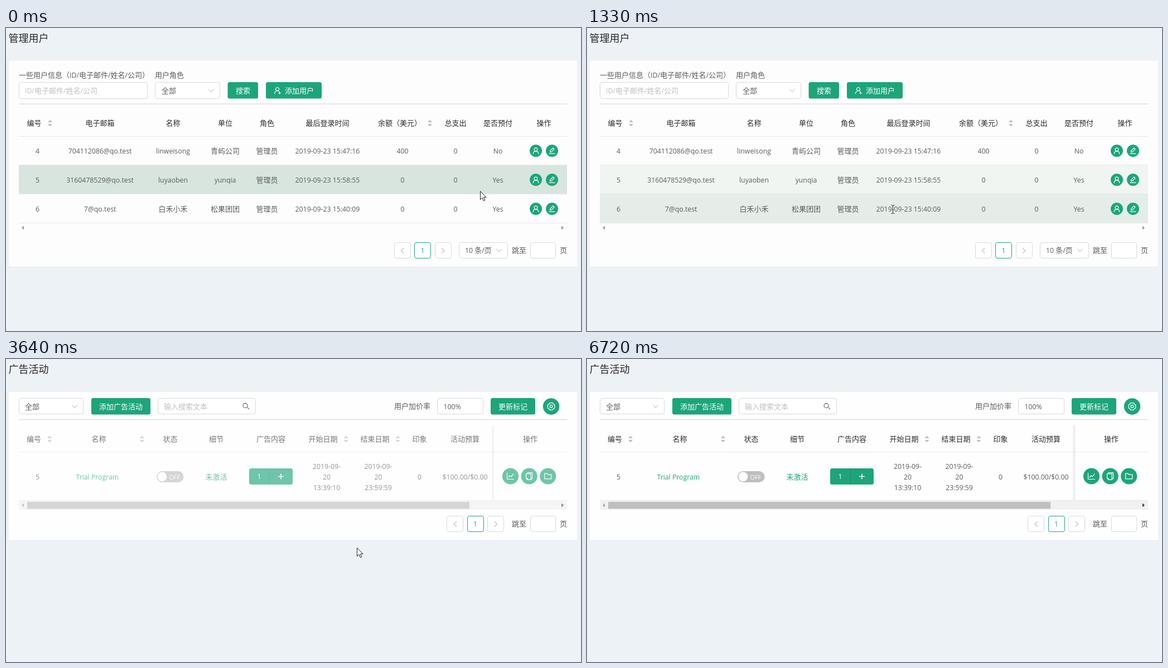
Write an HTML page that moves like this. It is 1031x543 px and loops after 7.15 s.

```html
<!DOCTYPE html>
<html lang="zh-CN">
<head>
<meta charset="utf-8">
<title>管理</title>
<style>
html, body { margin: 0; width: 100%; height: 100%; overflow: hidden; background: #edf2f7; }
svg { display: block; }
text { font: 13px 'Open Sans', 'Noto Sans CJK SC', 'Noto Sans CJK', sans-serif; fill: #5c5c5c; }
.l { font-size: .945em; }
.mid { text-anchor: middle; }
.head { fill: #2b2b2b; }
.title { font-size: 18px; fill: #262626; }
.hint { fill: #bfbfbf; }
.white { fill: #fff; }
.green { fill: #1da57a; }
.off { font-size: 11.5px; fill: #fff; }
.icon { fill: none; stroke: #fff; stroke-width: 1.2; stroke-linejoin: round; stroke-linecap: round; }
.chev { fill: none; stroke: #bfbfbf; stroke-width: 1.1; }
</style>
</head>
<body>
<svg width="1031" height="543" viewBox="0 0 1031 543">
  <defs>
    <linearGradient id="edge">
      <stop offset="0" stop-color="#000" stop-opacity="0"/>
      <stop offset="1" stop-color="#000" stop-opacity=".1"/>
    </linearGradient>
  </defs>
  <g id="users"></g>
  <g id="ads"></g>
  <g id="pointer">
    <path id="arrow" d="M.5.5V15.5L4 12.2L6.4 17.8L8.8 16.8L6.4 11.3H11Z" fill="#fff" stroke="#222" stroke-linejoin="round"/>
    <path id="beam" d="M-2.5-7.5H-1L.5-6.5L2-7.5H3.5M-2.5 7.5H-1L.5 6.5L2 7.5H3.5M.5-6.5V6.5" fill="none" stroke="#222"/>
    <path id="hand" d="M-1.5 1Q-1.5-.5 0-.5T1.5 1V6.5Q3 5.3 4.3 6.8Q6 6 7 7.6Q9 7.2 9.2 9.3V13Q9 16 7 18V20.5H-1V18.5L-5.5 12.5Q-6.2 10.8-4.8 10.2Q-3.5 10-1.5 12.5Z" fill="#fff" stroke="#222" stroke-linejoin="round"/>
  </g>
</svg>
<script>
const $ = id => document.getElementById(id);
const GREEN = '#1da57a', LINE = '#d9d9d9', SOFT = '#e8e8e8', HOVER = '#d8e5de';

const latin = s => s.replace(/[\x20-\x7e]+/g, m => `<tspan class="l">${m}</tspan>`);
const text = (x, cy, s, cls = '') => `<text x="${x}" y="${cy + 4.7}" class="${cls}">${latin(s)}</text>`;
const mid = (x, cy, s, cls = '') => text(x, cy, s, 'mid ' + cls);
const rect = (x, y, w, h, fill, extra = '') =>
  `<rect x="${x}" y="${y}" width="${w}" height="${h}" fill="${fill}" ${extra}/>`;
const box = (x, y, w, h, stroke = LINE) =>
  rect(Math.round(x) + .5, y + .5, w - 1, h - 1, '#fff', `rx="3.5" stroke="${stroke}"`);
const button = (x, y, w, h) => rect(x, y, w, h, GREEN, 'rx="3.5"');
const rule = (y, color) => rect(23, y, 983, 1, color);
const chev = (x, y) => `<path class="chev" d="M${x - 4.5} ${y - 2.5}l4.5 5 4.5-5"/>`;
const sorter = (x, y) =>
  `<path fill="#bfbfbf" d="M${x - 4} ${y - 1.5}h8l-4-4.5zM${x - 4} ${y + 1.5}h8l-4 4.5z"/>`;
const tri = (x, y, dir, color) =>
  `<path fill="${color}" d="M${x - 2 * dir} ${y - 3.5}v7l${4 * dir}-3.5z"/>`;
const headRow = (cols, cy) => Object.entries(cols).map(([name, x]) => mid(x, cy, name, 'head')).join('');

const shapes = {
  user: '<circle cy="-2.2" r="2.9"/><path d="M-4.8 5.6C-4.6-.6 4.6-.6 4.8 5.6"/>',
  edit: '<path d="M-3.6 2.4l.6-2.8 4.8-4.8 2.2 2.2-4.8 4.8zM-5 5.2h10"/>',
  add: '<circle cx="-.5" cy="-2.5" r="3"/><path d="M-5.5 5.5C-5-.2 2-.2 3 2M1.5 4.5h4M3.5 2.5v4"/>',
  chart: '<path d="M-6-5.5v11h12M-3.5 2l3-3.2 2 2 3.8-4.6"/>',
  copy: '<path d="M-3-4.5v-1.8h8.5v11h-1.8M-5.5-4.3h8.5v10.6h-6l-2.5-2.5zM-5.5 3.8h2.5v2.5"/>',
  folder: '<path d="M-6-4.8h4.2l1.6 2h6.2v7.6h-12z"/>',
  gear: '<path d="M-2.6-6.4h5.2l1 2 2.6 1.4v6l-2.6 1.4-1 2h-5.2l-1-2-2.6-1.4v-6l2.6-1.4z"/><circle r="2.4"/>',
  plus: '<path stroke-width="1.6" d="M-4.3 0h8.6M0-4.3v8.6"/>'
};
const icon = (x, y, name) => `<g class="icon" transform="translate(${x} ${y})">${shapes[name]}</g>`;
const round = (x, y, r, name) => `<circle cx="${x}" cy="${y}" r="${r}" fill="${GREEN}"/>` + icon(x, y, name);

function pager(x, y) {
  const cy = y + 14.5, pitch = 36.5;
  const step = (px, d) => box(px, y, 30, 29) +
    `<path class="chev" d="M${px + 15 - 2.5 * d} ${cy - 4}l${5 * d} 4.5l${-5 * d} 4.5"/>`;
  return step(x, -1) + box(x + pitch, y, 30, 29, GREEN) + mid(x + pitch + 14.8, cy, '1', 'green') +
    step(x + 2 * pitch, 1) + text(907, cy, '跳至') + box(940, y, 46, 29) + text(993, cy, '页');
}

function usersPage() {
  const cols = { 编号: 50.5, 电子邮箱: 168.5, 名称: 299.5, 单位: 393, 角色: 468, 最后登录时间: 576.5,
    '余额（美元）': 706, 总支出: 806, 是否预付: 882, 操作: 964.5 };
  const xs = Object.values(cols);
  xs[0] += 6;
  xs[6] += 5;
  const rows = [
    '4|704112086@qo.test|linweisong|青屿公司|管理员|2019-09-23 15:47:16|400|0|No',
    '5|3160478529@qo.test|luyaoben|yunqia|管理员|2019-09-23 15:58:55|0|0|Yes',
    '6|7@qo.test|白禾小禾|松果团团|管理员|2019-09-23 15:40:09|0|0|Yes'
  ];
  let s = text(4.5, 20.5, '管理用户', 'title') + rect(5, 59, 1019, 368, '#fdfdfd');
  s += text(23, 84, '一些用户信息（ID/电子邮件/姓名/公司）') + text(267, 84, '用户角色');
  s += box(23, 97, 231, 30) + text(34, 112.5, 'ID/电子邮件/姓名/公司', 'hint');
  s += box(267, 97, 117, 30) + text(279, 112, '全部') + chev(368, 112);
  s += button(397.5, 97, 54.5, 29.5) + mid(425, 112, '搜索', 'white');
  s += button(466, 97, 100, 29.5) + icon(487, 112, 'add') + text(500, 112, '添加用户', 'white');
  s += rect(23, 135.5, 983, 1.2, LINE) + headRow(cols, 170);
  s += sorter(79, 170.5) + sorter(760, 170.5) + rule(194, SOFT);
  rows.forEach((row, i) => {
    const cy = 220 + 52 * i;
    s += rect(23, cy - 26, 983, 52, HOVER, `id="row${i}"`) + rule(cy + 25, SOFT);
    row.split('|').forEach((v, k) => { s += mid(xs[k], cy, v); });
    s += round(950, cy, 11, 'user') + round(979, cy, 11, 'edit');
  });
  s += rect(514, 350, 358, 9, '#eee', 'id="track"');
  s += tri(30, 358, -1, '#9a9a9a') + tri(998, 358, 1, '#9a9a9a');
  return s + pager(695.7, 384) + box(812, 384, 88, 29) + text(823, 398.5, '10 条/页') + chev(884, 398.5);
}

function adsPage() {
  const cols = { 编号: 50, 名称: 166.5, 状态: 294.5, 细节: 377, 广告内容: 475, 开始日期: 568.5,
    结束日期: 661.5, 印象: 741.5, 活动预算: 823, 操作: 940 };
  let s = text(4.5, 20.5, '广告活动', 'title') + rect(5, 59, 1019, 265, '#fefefe');
  s += box(23, 70, 116, 29) + text(34, 85, '全部') + chev(123, 85);
  s += button(153, 70, 106, 29.5) + mid(206, 85, '添加广告活动', 'white');
  s += box(272, 70, 176, 29) + text(283, 85.5, '输入搜索文本', 'hint');
  s += '<g fill="none" stroke="#777" stroke-width="1.3"><path d="M432.4 86.4L436 90"/><circle cx="429" cy="83.5" r="4"/></g>';
  s += text(696, 84.5, '用户加价率') + box(773, 70, 83, 29) + text(784.5, 85.5, '100%');
  s += button(869, 70, 80, 29.5) + mid(909, 85, '更新标记', 'white') + round(977.5, 85, 14.7, 'gear');
  s += rect(23, 108, 983, 1.2, LINE) + '<g id="table">';
  s += rect(23, 167, 983, 87, HOVER, 'id="row3"') + rule(166.5, SOFT) + rule(253, SOFT) + headRow(cols, 143);
  for (const x of [78, 244, 609.5, 702.5]) s += sorter(x, 143.5);
  s += mid(56.5, 211, '5') + text(125.5, 211, 'Trial Program', 'green');
  s += rect(270, 201, 48.5, 20, '#bfbfbf', 'rx="10"') + '<circle cx="280" cy="211" r="8.4" fill="#fff"/>';
  s += text(292.5, 211, 'OFF', 'off') + mid(377, 211, '未激活', 'green');
  s += button(436, 196, 78, 29) + rect(471.7, 196, 1, 29, '#178f69');
  s += mid(454, 210.5, '1', 'white') + icon(493, 210.5, 'plus');
  ['13:39:10', '23:59:59'].forEach((time, k) =>
    ['2019-09-', '20', time].forEach((v, i) => { s += mid(575 + 92.5 * k, 192 + 19 * i, v); }));
  s += mid(741.5, 211, '0') + mid(823, 211, '$100.00/$0.00');
  s += rect(870, 119, 5, 134, 'url(#edge)');
  ['chart', 'copy', 'folder'].forEach((name, i) => { s += round(904.5 + 33.6 * i, 210, 14.6, name); });
  s += rect(23, 254, 983, 16, '#f1f1f1') + rect(38, 256, 793, 12.5, '#bfbfbf');
  s += tri(30, 262, -1, '#a3a3a3') + tri(998, 262, 1, '#404040') + '</g>';
  return s + pager(790.3, 281);
}

$('users').innerHTML = usersPage();
$('ads').innerHTML = adsPage();

const LOOP = 7150, SWITCH = 3090, GONE = 6700;
// Bursts of evenly spaced updates: start, end, intervals
const bursts = [[250, 1470, 9], [1850, 2820, 7], [3090, 3940, 6], [4220, 6720, 18]];
// Pointer stops: time, x, y
const stops = [[180, 850, 292], [520, 846, 226], [928, 818, 286], [1335, 548, 325], [1850, 548, 325],
  [2543, 948, 280], [2960, 948, 280], [3657, 629, 338], [4220, 629, 338], [4637, 308, 260],
  [5200, 420, 200], [5750, 480, 16], [6300, 500, 427], [6600, 782, 465]];
// Per row: [enter, leave] spans
const hovers = [[[330, 905]], [[-400, 330], [905, 1225], [2400, LOOP]], [[1225, 2400]], [[4700, 5400]]];

const clamp = p => Math.min(1, Math.max(0, p));
function fade(t, at) {
  const q = 1 - (1 - clamp((t - at) / 300)) ** 2;
  return q * q * (3 - 2 * q);
}
const show = (id, on) => { $(id).style.display = on ? '' : 'none'; };

function hold(t) {
  const burst = bursts.filter(b => b[0] <= t).pop();
  if (!burst) return 0;
  const [from, to, n] = burst, gap = (to - from) / n;
  return from + gap * Math.min(n, Math.floor((t - from + 20) / gap));
}

function place(t) {
  const i = Math.max(1, stops.findIndex(s => s[0] > t));
  const [a, b] = t >= stops.at(-1)[0] ? stops.slice(-2) : [stops[i - 1], stops[i]];
  const f = clamp((t - a[0]) / (b[0] - a[0]));
  return [1, 2].map(k => Math.round(a[k] + (b[k] - a[k]) * f));
}

function draw(now) {
  const t = hold(now);
  show('users', t < SWITCH);
  show('ads', t >= SWITCH);
  show('track', t > 2400 && t < 2800);
  $('table').style.opacity = .5 + .5 * fade(t, 3600);
  hovers.forEach((spans, i) => {
    $('row' + i).style.opacity = Math.max(...spans.map(([a, b]) => fade(t, a) * (1 - fade(t, b))));
  });
  const kind = t > 1300 && t < 1850 ? 'beam' : t > 2500 && t < 3200 ? 'hand' : 'arrow';
  for (const k of ['arrow', 'beam', 'hand']) show(k, k === kind);
  show('pointer', t < GONE);
  $('pointer').setAttribute('transform', `translate(${place(t)})`);
}

const start = performance.now();
function loop() {
  draw((performance.now() - start) % LOOP);
  requestAnimationFrame(loop);
}
loop();
</script>
</body>
</html>
```
